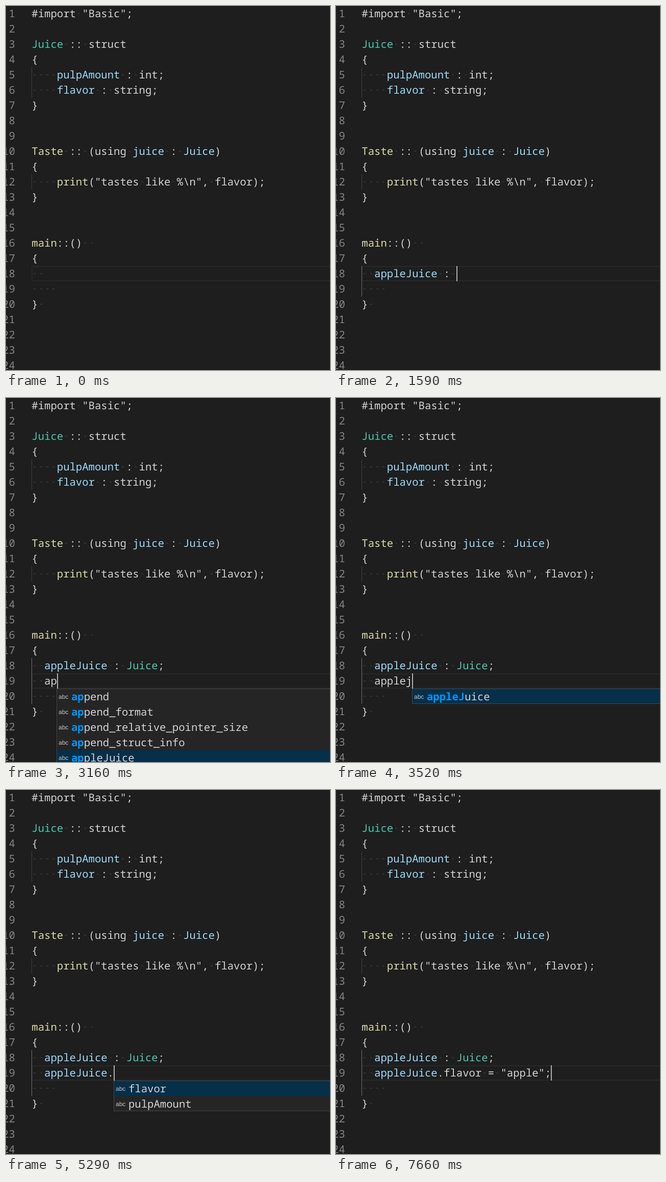
These frames come from a looping animation (635x714 px, 8 s). An HTML page:

```html
<!DOCTYPE html>
<html lang="en">
<head>
<meta charset="utf-8">
<title>Typing a struct instance</title>
<style>
  html, body { margin: 0; width: 100%; height: 100%; overflow: hidden; background: #1e1e1e; }
  svg { display: block; width: 635px; height: 714px; }
  text { font: 20.62px "Noto Sans Mono", "DejaVu Sans Mono", monospace; fill: #d4d4d4;
         white-space: pre; text-rendering: geometricPrecision; }
  .n { fill: #858585; text-anchor: end; }
  .t { fill: #4ec9b0; }
  .v { fill: #9cdcfe; }
  .f { fill: #dcdcaa; }
  .m { fill: #0097fb; font-weight: bold; }
  .icon { font: 12px "Liberation Sans", Arial, sans-serif; fill: #c5c5c5; }
</style>
</head>
<body>
<svg viewBox="0 0 635 714">
  <rect width="635" height="714" fill="#1e1e1e"/>
  <g id="fixed"></g>
  <g id="live"></g>
</svg>
<script>
const LOOP = 8000, LEFT = 50.3, CHAR = 12.37, ROW = 30, BASE = 22;
const colX = col => LEFT + col * CHAR;
const rowY = row => (row - 1) * ROW;
const rect = (x, y, w, h, fill, extra = '') =>
  `<rect x="${x}" y="${y}" width="${w}" height="${h}" fill="${fill}" ${extra}/>`;
const label = (x, y, text, cls = '') => `<text x="${x}" y="${y}" class="${cls}">${text}</text>`;

// Markup: segments split by "|", each with an optional "class^" prefix.
const segments = markup => markup.split('|').map(s => {
  const [text, cls = ''] = s.split('^').reverse();
  return { text, cls };
});
const plain = markup => segments(markup).map(s => s.text).join('');

function words(markup, x, y) {
  let out = '', col = 0;
  for (const { text, cls } of segments(markup)) {
    for (const w of text.matchAll(/\S+/g))
      out += label(x + (col + w.index) * CHAR, y, w[0], cls);
    col += text.length;
  }
  return out;
}

function codeLine(row, markup) {
  const y = rowY(row);
  let out = '';
  [...plain(markup)].forEach((c, i) => {
    if (c === ' ') out += rect(Math.round(colX(i) + 4), y + 14, 4, 2, '#333');
  });
  return out + words(markup, LEFT, y + BASE);
}

const guide = (row, rows, fill) => rect(50, rowY(row), 1, rows * ROW, fill);

const CODE = {
  1: '#import "Basic";',
  3: 't^Juice| :: struct',
  4: '{',
  5: '    |v^pulpAmount| : int;',
  6: '    |v^flavor| : string;',
  7: '}',
  10: 'f^Taste| :: (using |v^juice| : |v^Juice|)',
  11: '{',
  12: '    |f^print|("tastes like %\\n", flavor);',
  13: '}',
  16: 'f^main|::()  ',
  17: '{'
};

const LISTS = {
  a: ['m^a|lloc', 'm^a|ny', 'm^a|ppend', 'm^a|ppend_format', 'm^a|ppend_relative_pointer_size',
      'm^a|ppend_struct_info'],
  ap: ['m^ap|pend', 'm^ap|pend_format', 'm^ap|pend_relative_pointer_size', 'm^ap|pend_struct_info'],
  ap2: ['m^ap|pend', 'm^ap|pend_format', 'm^ap|pend_relative_pointer_size', 'm^ap|pend_struct_info',
        'm^ap|pleJuice', 'm^ap|ply'],
  app: ['m^app|end', 'm^app|end_format', 'm^app|end_relative_pointer_size', 'm^app|end_struct_info'],
  appl: ['m^app|end_re|m^l|ative_pointer_size'],
  appl2: ['m^appl|eJuice', 'm^app|end_re|m^l|ative_pointer_size'],
  apple: ['m^appe|nd_re|m^l|ative_pointer_size'],
  apple2: ['m^apple|Juice', 'm^appe|nd_re|m^l|ative_pointer_size'],
  appleOnly: ['m^apple|Juice'],
  applej: ['m^appleJ|uice'],
  ju: ['m^Ju|ice', 'm^ju|ice'],
  jui: ['m^Jui|ce', 'm^jui|ce'],
  fields: ['flavor', 'pulpAmount']
};

const DECL = 'v^appleJuice| : ';
const USE = 'v^appleJuice|.flavor';

// Each step overrides part of the state that came before it.
const STEPS = [
  [0, { row: 18, text: '', list: '', sel: 0, caret: 0, guide: 0, slider: 0 }],
  [30, { text: 'a', caret: 1, guide: 1 }],
  [95, { list: 'a' }],
  [160, { slider: .5 }],
  [300, { slider: 1 }],
  [500, { text: 'ap', list: 'ap', slider: 0 }],
  [590, { text: 'app', list: 'app' }],
  [680, { text: 'appl', list: 'appl' }],
  [770, { text: 'apple', list: 'apple' }],
  [950, { text: 'appleJ', list: '' }],
  [1090, { text: 'appleJu' }],
  [1160, { text: 'appleJui' }],
  [1230, { text: 'appleJuic' }],
  [1295, { text: 'appleJuice' }],
  [1365, { text: 'appleJuice ' }],
  [1430, { text: 'appleJuice :' }],
  [1500, { text: 'v^appleJuice| :' }],
  [1570, { text: DECL }],
  [1640, { text: DECL + 'j' }],
  [1700, { text: DECL + 'ju' }],
  [1770, { list: 'ju' }],
  [1840, { text: DECL + 'jui', list: 'jui' }],
  [2110, { text: DECL + 'Juice', list: '' }],
  [2300, { text: DECL + 'Juice;' }],
  [2380, { text: DECL + '|t^Juice|;' }],
  [2610, { row: 19, text: '' }],
  [2800, { text: 'a' }],
  [2900, { list: 'a' }],
  [3070, { text: 'ap', list: 'ap2' }],
  [3160, { sel: 4 }],
  [3240, { text: 'app', list: 'app' , sel: 0 }],
  [3310, { text: 'appl', list: 'appl2' }],
  [3370, { text: 'apple', list: 'apple2' }],
  [3520, { text: 'applej', list: 'applej' }],
  [3720, { text: 'appleJuice', list: '' }],
  [3920, { text: 'v^appleJuice' }],
  [4030, { caret: 0 }],
  [4240, { text: 'v^appleJuice|.', caret: 1 }],
  [4340, { list: 'fields' }],
  [4650, { caret: 0 }],
  [4970, { caret: 1, sel: 1 }],
  [5240, { caret: 0 }],
  [5290, { caret: 1, sel: 0 }],
  [5560, { text: USE, list: '' }],
  [5860, { caret: 0 }],
  [5950, { text: USE + ' ', caret: 1 }],
  [6050, { text: USE + ' =' }],
  [6250, { text: USE + ' = ' }],
  [6420, { text: USE + ' = "' }],
  [6650, { text: USE + ' = "a' }],
  [6740, { text: USE + ' = "ap' }],
  [6820, { text: USE + ' = "app' }],
  [6900, { text: USE + ' = "appl' }],
  [6980, { list: 'appl2' }],
  [7070, { text: USE + ' = "apple', list: 'appleOnly' }],
  [7380, { text: USE + ' = "apple"', list: '' }],
  [7660, { text: USE + ' = "apple";' }]
];

function stateAt(t) {
  const s = {};
  for (const [at, change] of STEPS) {
    if (at > t) break;
    Object.assign(s, change);
  }
  return s;
}

function popup(s, x, top) {
  const rows = LISTS[s.list], w = 537, h = rows.length * ROW;
  let out = rect(x, top, w, h, '#252526');
  rows.forEach((markup, i) => {
    const y = top + i * ROW;
    if (i === s.sel) out += rect(x + 1, y + 1, w - 2, ROW - 1, '#062f4a');
    out += label(x + 4, y + 20, 'abc', 'icon') + words(markup, x + 29, y + BASE + 1);
  });
  out += rect(x + .5, top + .5, w - 1, h - 1, 'none', 'stroke="#454545"');
  if (s.slider) out += rect(x + w - 14, top + 12, 13, 130, '#797979', `opacity="${.4 * s.slider}"`);
  return out;
}

function scene(s) {
  const y = rowY(s.row), x = colX(2 + plain(s.text).length);
  let out = rect(51, y + 1, 600, ROW - 2, 'none', 'stroke="#282828" stroke-width="2"');
  if (s.row === 19) out += codeLine(18, '  |' + DECL + '|t^Juice|;');
  out += codeLine(s.row, '  |' + s.text);
  out += codeLine(s.row + 1, '    ') + codeLine(s.row + 2, '} ');
  if (s.guide) out += guide(18, s.row - 16, '#707070');
  if (s.list) out += popup(s, Math.floor(x), y + ROW);
  if (s.caret) out += rect(Math.round(x - .2), y, 2, ROW, '#aeafad');
  return out;
}

let fixed = guide(5, 2, '#404040') + guide(12, 1, '#404040');
for (let n = 1; n <= 24; n++) fixed += label(17.8, rowY(n) + BASE, n, 'n');
for (const n in CODE) fixed += codeLine(+n, CODE[n]);
document.getElementById('fixed').innerHTML = fixed;

const live = document.getElementById('live');
const start = performance.now();
let shown = '';
function frame() {
  const next = scene(stateAt((performance.now() - start) % LOOP));
  if (next !== shown) live.innerHTML = shown = next;
  requestAnimationFrame(frame);
}
frame();
</script>
</body>
</html>
```
